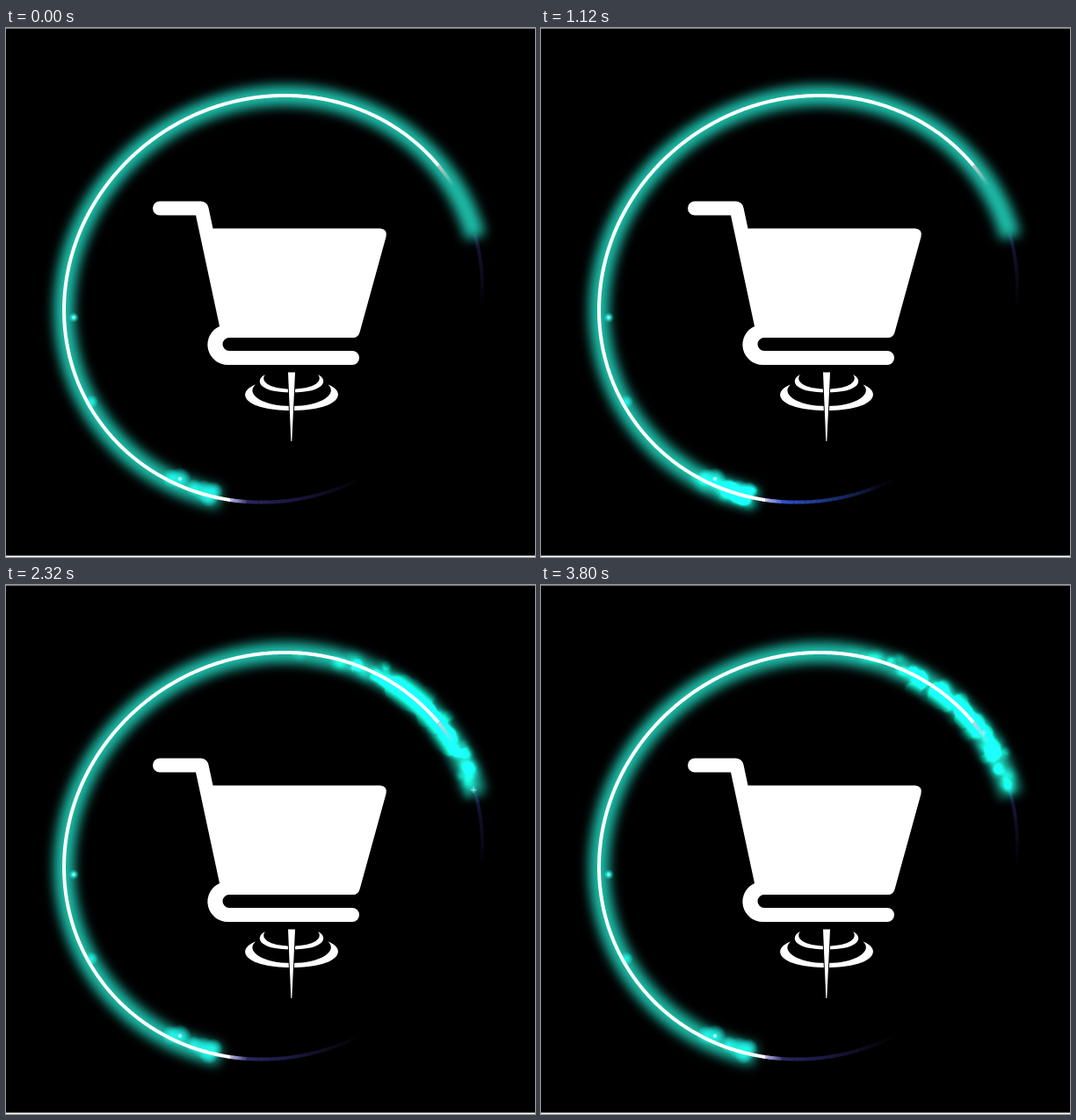
Write an HTML page with a canvas that moves like this. It is 602 px wide and 603 px high and loops after 3840 ms.

```html
<!DOCTYPE html>
<html lang="en">
<head>
<meta charset="utf-8">
<style>
  html, body { margin: 0; width: 100%; height: 100%; overflow: hidden; background: #000; }
  canvas { display: block; }
</style>
</head>
<body>
<canvas id="stage" width="602" height="603"></canvas>
<script>
const W = 602, H = 603, LOOP = 3840, STEP = 40, START = 120;
const ctx = document.getElementById('stage').getContext('2d');
const rad = deg => deg * Math.PI / 180;

function layer(w, h) {
  const c = document.createElement('canvas');
  c.width = w;
  c.height = h;
  return c.getContext('2d');
}

// The ring is a slightly tilted ellipse, addressed by polar angle.
function ringPoint(deg, offset = 0) {
  const a = rad(deg), tilted = a + rad(32.4);
  const r = 1 / Math.hypot(Math.cos(tilted) / 242, Math.sin(tilted) / 227.6) + offset;
  return [304 + r * Math.cos(a), 308.8 + r * Math.sin(a)];
}

function strokeRing(g, from, to, width, color) {
  g.beginPath();
  for (let a = from; a < to; a += 0.5) g.lineTo(...ringPoint(a));
  g.lineTo(...ringPoint(to));
  g.lineWidth = width;
  g.strokeStyle = color;
  g.stroke();
}

function fadeRing(g, from, to, width, rgb, alphaFrom, alphaTo) {
  const n = 24, d = (to - from) / n;
  for (let i = 0; i < n; i++) {
    const alpha = alphaFrom + (alphaTo - alphaFrom) * (i + 0.5) / n;
    const a = from + i * d;
    strokeRing(g, Math.min(a, a + d), Math.max(a, a + d), width, `rgba(${rgb},${alpha})`);
  }
}

function softDot(g, x, y, r, rgb, alpha = 1) {
  const fill = g.createRadialGradient(x, y, 0, x, y, r);
  fill.addColorStop(0, `rgba(${rgb},${alpha})`);
  fill.addColorStop(0.45, `rgba(${rgb},${alpha * 0.65})`);
  fill.addColorStop(1, `rgba(${rgb},0)`);
  g.fillStyle = fill;
  g.fillRect(x - r, y - r, 2 * r, 2 * r);
}

// Glow and dim tails: everything the sparks light up.
const glow = layer(W, H);
glow.fillStyle = '#000';
glow.fillRect(0, 0, W, H);
fadeRing(glow, 102, 64, 4, '48,44,112', 1, 0);
fadeRing(glow, -18, 3, 4, '24,24,62', 1, 0);
glow.filter = 'blur(6.5px)';
strokeRing(glow, 105, 343, 23, '#1dbfaa');
glow.filter = 'none';
[[77, 330, 6], [97, 426, 8], [188, 513, 11], [198, 514, 13],
 [214, 524, 10], [225, 528, 13], [236, 528, 11], [231, 535, 11]]
  .forEach(([x, y, r]) => softDot(glow, x, y, r, '30,255,242', 0.9));

// Crisp white artwork on top.
const art = layer(W, H);
strokeRing(art, 102, 321, 4, '#fff');
fadeRing(art, 321, 328, 4, '225,205,205', 0.95, 0);
fadeRing(art, 102, 97, 4, '215,210,255', 1, 0);
softDot(art, 198, 514, 3, '220,255,255');
softDot(art, 77, 330, 3, '150,255,250');
art.fillStyle = '#fff';
[
  'M175 197.5H222Q229 198 230.5 205L235.5 228.500H426Q434.500 229.500 432.500 238L402.500 347Q400.500 353 395 353H254A7.500 7.500 0 0 0 254 368H394A8 8 0 0 1 394 384H253A23 23 0 0 1 243 340L216 213.500H175A8 8 0 0 1 175 197.500Z',
  'M295 395C283 401 286 415.500 325 415.500S367 401 355 395C361 402 352 411.500 325 411.500S289 402 295 395Z',
  'M284 406.500C261 415 270 436 325 436S389 415 366.500 406.500C378 417 359 431 325 431S272 417 284 406.500Z'
].forEach(d => art.fill(new Path2D(d)));
const spike = new Path2D('M321 392.500H329L325.300 471H324.300Z');
art.lineWidth = 2;
art.strokeStyle = '#000';
art.stroke(spike);
art.fill(spike);
art.fillRect(0, 601.5, W, 1.5);
art.fillStyle = '#777';
art.fillRect(0, 0, W, 1);

const puff = layer(32, 32);
softDot(puff, 16, 16, 16, '18,120,120');

let seed = 7;
const rand = () => (seed = seed * 16807 % 2147483647) / 2147483647;
const bell = () => rand() + rand() + rand() - 1.5;

const path = [[120, 285], [640, 140], [720, 128], [1200, 62], [1720, -35], [1900, -45], [LOOP, -45]];
function headAngle(t) {
  const i = Math.max(1, path.findIndex(([time]) => time >= t));
  const [t0, a0] = path[i - 1], [t1, a1] = path[i];
  return a0 + (a1 - a0) * (t - t0) / (t1 - t0);
}

const COUNT = 1500;
const puffs = Array.from({ length: COUNT }, (_, i) => {
  const born = START + i * (LOOP - START) / COUNT;
  const settled = Math.min(1, Math.max(0, (born - 1800) / 300));
  return {
    born,
    angle: headAngle(born) + bell() * (5 + 17 * settled),
    drift: bell() * (8 + 32 * settled),
    offset: bell() * 20,
    rise: bell() * 16,
    size: 6 + 7 * rand(),
    life: 280 + 160 * rand()
  };
});

const sparkles = Array.from({ length: 26 }, (_, i) => ({
  born: 2200 + i * 62,
  angle: -50 + bell() * 48,
  offset: bell() * 22
}));

function drawSparkle(s, t) {
  const age = (t - s.born) / 160;
  if (age < 0 || age > 1) return;
  const [x, y] = ringPoint(s.angle, s.offset);
  ctx.globalAlpha = 0.35 * (1 - age);
  softDot(ctx, x, y, 4, '190,200,200');
  ctx.fillStyle = '#cbb';
  ctx.fillRect(x - 4, y - 0.5, 8, 1);
  ctx.fillRect(x - 0.5, y - 4, 1, 8);
}

// Puffs add up to a capped brightness, which then dodges the glow.
const heat = layer(W, H);
function fillHeat(mode, color) {
  heat.globalAlpha = 1;
  heat.globalCompositeOperation = mode;
  heat.fillStyle = color;
  heat.fillRect(0, 0, W, H);
}

function drawHeat(t) {
  fillHeat('source-over', '#000');
  heat.globalCompositeOperation = 'lighter';
  for (const p of puffs) {
    const age = (t - p.born) / p.life;
    if (age < 0 || age > 1) continue;
    const [x, y] = ringPoint(p.angle + p.drift * age, p.offset + p.rise * age);
    const r = p.size * (1 + 0.3 * age);
    heat.globalAlpha = 1 - age;
    heat.drawImage(puff.canvas, x - r, y - r, 2 * r, 2 * r);
  }
  fillHeat('darken', 'rgb(25,135,130)');
}

function draw(t) {
  ctx.drawImage(glow.canvas, 0, 0);
  if (t >= START) {
    drawHeat(t);
    ctx.globalCompositeOperation = 'color-dodge';
    ctx.drawImage(heat.canvas, 0, 0);
    ctx.globalCompositeOperation = 'lighter';
    sparkles.forEach(s => drawSparkle(s, t));
  }
  ctx.globalAlpha = 1;
  ctx.globalCompositeOperation = 'source-over';
  ctx.drawImage(art.canvas, 0, 0);
}

const origin = performance.now();
function tick() {
  const t = (performance.now() - origin) % LOOP;
  draw(Math.floor(t / STEP) * STEP);
  requestAnimationFrame(tick);
}
tick();
</script>
</body>
</html>
```
